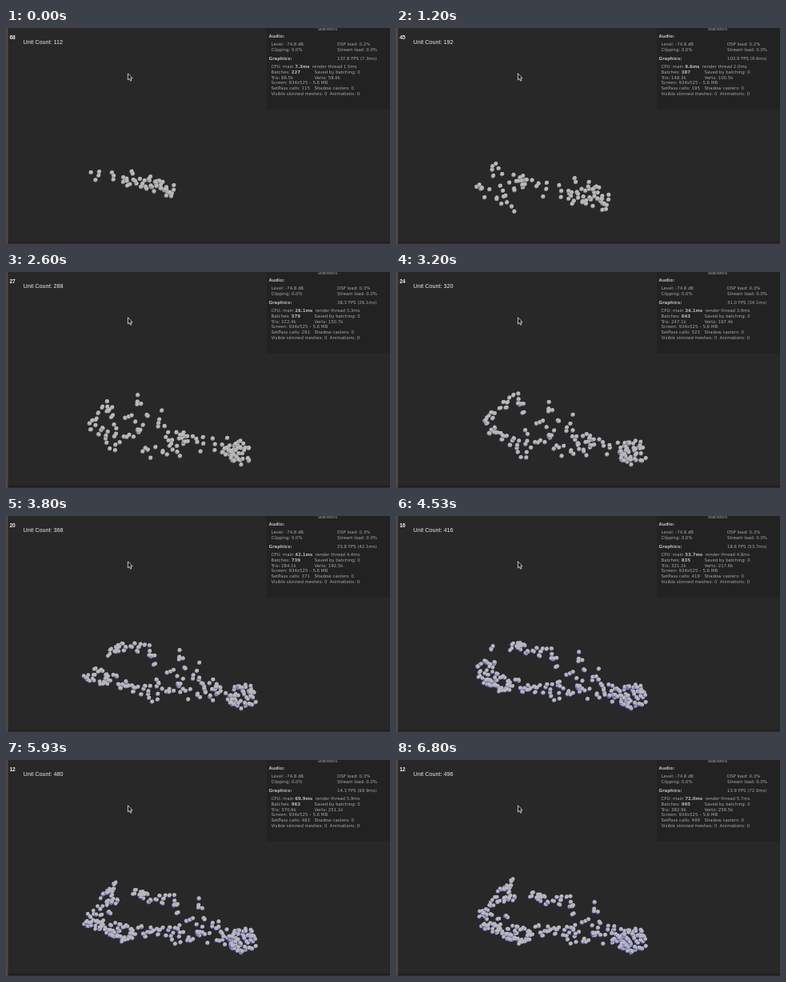
Animation of 480 by 270 pixels, one loop 6.87 s. Source, as an HTML page:

```html
<!DOCTYPE html>
<html lang="en">
<head>
<meta charset="utf-8">
<title>Unit flow</title>
<style>
  html, body { margin: 0; width: 100%; height: 100%; overflow: hidden; background: #282828; }
  svg { display: block; width: 100vw; height: 100vh; }
  text { white-space: pre; }
  .panel { font: 5.4px "DejaVu Sans", sans-serif; fill: #a6a6a6; }
  .panel .b { font-weight: bold; fill: #b8b8b8; }
  .hud { font-family: "Liberation Sans", Arial, sans-serif; fill: #ececec; }
</style>
</head>
<body>
<svg id="stage" viewBox="0 0 480 270">
  <rect width="480" height="270" fill="#282828"/>
  <rect width="2.5" height="270" fill="#514a45"/>
  <rect x="2.5" y="267" width="477.5" height="1.2" fill="#1d1a1a"/>
  <rect x="2.5" y="268.2" width="477.5" height="1.8" fill="#2a2627"/>
  <rect x="326" width="154" height="101.5" fill="#222"/>
  <g id="panel" class="panel"></g>
  <g class="hud">
    <text id="rate" x="4.4" y="14.2" font-size="6.7" font-weight="bold"></text>
    <text id="count" x="21.5" y="20.4" font-size="7.2"></text>
  </g>
  <g id="units"></g>
  <path d="M152.4 56.8v8.2l1.9-1.7 1.3 2.9 1.3-.6-1.2-2.8h2.4z" fill="#111" stroke="#eee" stroke-width=".8"/>
</svg>
<script>
const NS = "http://www.w3.org/2000/svg";
const LOOP = 6870, STEPS_PER_SECOND = 15, LAST_STEP = 102;
const MAX_UNITS = 496, FIRST_UNITS = 112;
const byId = id => document.getElementById(id);

function add(parent, tag, attrs = {}, content = "") {
  const node = document.createElementNS(NS, tag);
  for (const key in attrs) node.setAttribute(key, attrs[key]);
  node.textContent = content;
  return parent.appendChild(node);
}

let seed = 71;
function random() {
  seed = (seed + 0x6D2B79F5) | 0;
  let n = Math.imul(seed ^ (seed >>> 15), 1 | seed);
  n = (n + Math.imul(n ^ (n >>> 7), 61 | n)) ^ n;
  return ((n ^ (n >>> 14)) >>> 0) / 4294967296;
}
const spread = () => random() * 2 - 1;
const clamp = (v, lo = 0, hi = 1) => Math.min(hi, Math.max(lo, v));
const ease = v => v * v * (3 - 2 * v);

function lerpTable(xs, ys, x) {
  if (x <= xs[0]) return ys[0];
  let i = 1;
  while (i < xs.length - 1 && x > xs[i]) i++;
  const u = clamp((x - xs[i - 1]) / (xs[i] - xs[i - 1]));
  return ys[i - 1] + (ys[i] - ys[i - 1]) * u;
}

// Values over the run, by simulation step; travel slows as the frame rate drops
const keySteps = [0, 18, 39, 57, 68, 89, 102];
const curves = {
  units: [112, 192, 288, 368, 416, 480, 496],
  travel: [0, 72, 142, 195, 210, 226, 235],
  rate: [68, 45, 27, 20, 16, 12, 12],
  cpu: [7.3, 9.6, 26.1, 42.1, 53.7, 69.9, 72],
  fps: [137.8, 103.9, 38.3, 23.8, 18.6, 14.3, 13.9],
  render: [1.5, 2, 3.3, 4.4, 4.8, 5.9, 5.7]
};
const valueAt = (name, step) => lerpTable(keySteps, curves[name], step);
const unitsAt = step => Math.min(MAX_UNITS, Math.floor(valueAt("units", step) / 16 + 0.4) * 16);

// Units slow down as they close in on the goal
const advance = distance => lerpTable([0, 100, 190, 250], [0, 100, 170, 205], distance);

const lanes = {
  main: { start: 105, width: 20, xs: [95, 135, 165, 200, 235, 268, 300], ys: [180, 184, 192, 201, 209, 215, 225] },
  upper: { start: 113, width: 14, xs: [95, 112, 124, 150, 185, 240, 270, 300], ys: [203, 189, 174, 162, 175, 186, 206, 225] },
  lower: { start: 108, width: 17, xs: [100, 120, 140, 165, 195, 250, 300], ys: [195, 203, 214, 222, 218, 216, 225] }
};

function birthStep(index) {
  let step = 0;
  while (step < LAST_STEP && unitsAt(step) <= index) step++;
  return step;
}

function pickLane(birth) {
  if (birth < 0) return lanes.main;
  const r = random();
  if (birth > 145) return r < 0.5 ? lanes.upper : lanes.lower;
  return r < 0.2 ? lanes.upper : r < 0.45 ? lanes.lower : lanes.main;
}

function makeUnits() {
  const units = [];
  let group;
  for (let i = 0; i < MAX_UNITS; i += 2) {
    const early = i < FIRST_UNITS;
    const birth = early ? -108 * Math.pow(random(), 0.62) : valueAt("travel", birthStep(i));
    if (i % 8 === 0) group = { lane: pickLane(birth), offset: spread() };
    const late = clamp((birth - 130) / 60);
    const angle = random() * 2 * Math.PI, radius = 18 * Math.sqrt(random());
    const unit = {
      birth, early, lane: group.lane,
      shift: spread() * (early ? 4 : 11),
      offset: early ? (spread() + spread()) * 0.6 : group.offset * (0.5 + 0.3 * late) + spread() * (0.6 - 0.3 * late),
      goalX: 297 + radius * Math.cos(angle),
      goalY: 225 + radius * 0.9 * Math.sin(angle)
    };
    // Units come in pairs; later pairs string out along their lane
    units.push({ ...unit, lag: 0, dy: 0 },
               { ...unit, lag: 0.4 + 5 * late * random(), dy: spread() * (0.4 + 2 * late) });
  }
  return units;
}

function place(unit, travel) {
  const { lane, early } = unit;
  const free = lane.start + unit.shift - unit.lag + advance(Math.max(0, travel - unit.birth));
  const x = Math.min(free, unit.goalX);
  const width = early ? 10 + Math.min(travel, 70) * 0.1 : lane.width;
  const laneY = lerpTable(lane.xs, lane.ys, x) + unit.offset * width;
  const arrival = ease(clamp((free - 255) / 40));
  return [x, laneY + (unit.goalY - laneY) * arrival + unit.dy];
}

const units = makeUnits();
for (const unit of units) {
  unit.node = add(byId("units"), "g");
  add(unit.node, "circle", { cx: -0.5, cy: 0.7, r: 2.3 });
  add(unit.node, "circle", { r: 2.25, fill: "#b9b9b9" });
}

const panel = byId("panel");
const label = (x, y, content = "", cls = "") => add(panel, "text", { x, y, class: cls }, content);

function row(y, before, after = "") {
  const line = label(331.5, y);
  add(line, "tspan", {}, before);
  const value = add(line, "tspan", { class: "b" });
  const tail = add(line, "tspan", {}, after);
  return { value, tail };
}

label(389.5, 3, "Statistics");
label(328.5, 12.2, "Audio:", "b");
label(331.5, 22.2, "Level: -74.8 dB");
label(331.5, 29, "Clipping: 0.0%");
label(414, 29, "Stream load: 0.0%");
label(328.5, 39.6, "Graphics:", "b");
label(385.5, 56.8, "Saved by batching: 0");
label(331.5, 70.2, "Screen: 934x525 – 5.6 MB");
label(385.5, 77, "Shadow casters: 0");
label(331.5, 83.7, "Visible skinned meshes: 0  Animations: 0");
const dsp = label(414, 22.2);
const fps = label(414, 40.4);
const cpu = row(50, "CPU: main ");
const batches = row(56.8, "Batches: ");
const tris = label(331.5, 63.5);
const verts = label(385.5, 63.5);
const passes = label(331.5, 77);

function showStats(step, count) {
  const ms = valueAt("cpu", step).toFixed(1);
  byId("rate").textContent = Math.round(valueAt("rate", step));
  byId("count").textContent = `Unit Count: ${count}`;
  dsp.textContent = `DSP load: ${step < 30 ? "0.2" : "0.3"}%`;
  fps.textContent = `${valueAt("fps", step).toFixed(1)} FPS (${ms}ms)`;
  cpu.value.textContent = `${ms}ms`;
  cpu.tail.textContent = `  render thread ${valueAt("render", step).toFixed(1)}ms`;
  batches.value.textContent = 2 * count + 3;
  tris.textContent = `Tris: ${(count * 0.7719 + 0.05).toFixed(1)}k`;
  verts.textContent = `Verts: ${(count * 0.523 + 0.05).toFixed(1)}k`;
  passes.textContent = `SetPass calls: ${count + 3}`;
}

function draw(step) {
  const count = unitsAt(step), travel = valueAt("travel", step);
  const tint = clamp((step - 39) / 29);
  const dim = 130 - 38 * tint;
  byId("units").setAttribute("fill", `rgb(${dim},${dim},${130 + 55 * tint})`);
  units.forEach((unit, i) => {
    unit.node.setAttribute("display", i < count ? "inline" : "none");
    if (i >= count) return;
    const [x, y] = place(unit, travel);
    unit.node.setAttribute("transform", `translate(${x.toFixed(2)} ${y.toFixed(2)})`);
  });
  showStats(step, count);
}

const start = performance.now();
let shown = -1;
function tick() {
  const ms = Math.max(0, performance.now() - start) % LOOP;
  const step = Math.min(LAST_STEP, Math.floor((ms + 5) * STEPS_PER_SECOND / 1000));
  if (step !== shown) draw(shown = step);
  requestAnimationFrame(tick);
}
tick();
</script>
</body>
</html>
```
